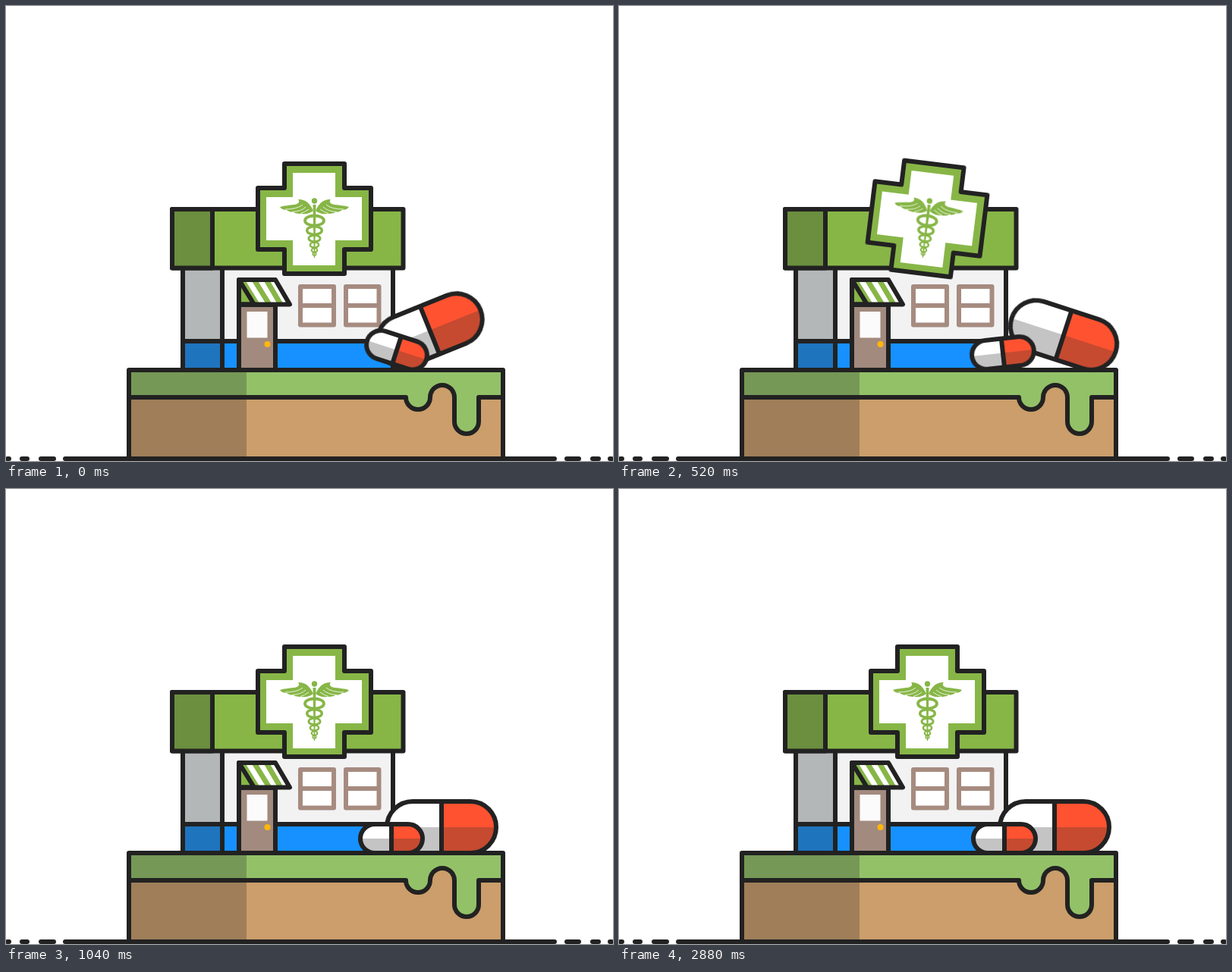
Write an HTML page that moves like this. It is 800 px wide and 600 px high and loops after 3200 ms.

```html
<!DOCTYPE html>
<html lang="en">
<head>
<meta charset="utf-8">
<title>Pharmacy</title>
<style>
  html, body { margin: 0; width: 100%; height: 100%; overflow: hidden; background: #fff; }
  svg { display: block; width: 800px; height: 600px; }
  .ink { stroke: #222; stroke-width: 6; stroke-linejoin: round; stroke-linecap: round; }
  .line { fill: none; }
  .leaf { fill: #87b647; }
  .moss { fill: #6b8e3f; }
  .frame { fill: #fff; stroke: #a68b80; stroke-width: 6; stroke-linejoin: round; }
</style>
</head>
<body>
<svg viewBox="0 0 800 600">
  <defs>
    <clipPath id="bigClip"><rect x="-72" y="-34" width="144" height="68" rx="34"/></clipPath>
    <clipPath id="smallClip"><rect x="-41" y="-19" width="82" height="38" rx="19"/></clipPath>
    <g id="halves">
      <rect x="-80" y="-40" width="80" height="40" fill="#fff"/>
      <rect x="-80" width="80" height="40" fill="#c4c4c4"/>
      <rect y="-40" width="80" height="40" fill="#ff5231"/>
      <rect width="80" height="40" fill="#c54a30"/>
    </g>
    <g id="wing">
      <path class="leaf" d="M405 270 C402 263 396 254 385 255 C388 258 385 262 379 262 C373 263 367 263 361 265 C363 268 367 269 370 269 C372 271 376 272 379 272 C382 274 388 274 390 274 C396 275 401 273 405 270Z"/>
      <path fill="none" stroke="#fff" stroke-width=".8" d="M368 268 Q384 268 391 262 M377 271.5 Q389 271 395 265 M388 273.5 Q394 272 399 268"/>
    </g>
  </defs>

  <!-- ground -->
  <path class="ink line" d="M2 597H4 M21 597H28 M46 597H63 M78 597H723 M739 597H755 M773 597H781 M796 597H798"/>
  <path fill="#cb9e6b" d="M162 480H655V597H162Z"/>
  <path fill="#93c168" d="M162 480H655V516H623V548A16 16 0 0 1 591 548V516A16 16 0 0 0 559 516A16 16 0 0 1 527 516H162Z"/>
  <path fill="#9f7e59" d="M162 516H317V597H162Z"/>
  <path fill="#769856" d="M162 480H317V516H162Z"/>
  <path class="ink line" d="M162 480H655V597H162Z M162 516H527A16 16 0 0 0 559 516A16 16 0 0 1 591 516V548A16 16 0 0 0 623 548V516H655"/>

  <!-- shop walls and roof -->
  <path fill="#b3b7b8" d="M233 345H285V442H233Z"/>
  <path fill="#f2f2f3" d="M285 345H510V442H285Z"/>
  <path fill="#1f74be" d="M233 442H285V480H233Z"/>
  <path fill="#1691ff" d="M285 442H510V480H285Z"/>
  <path class="ink line" d="M233 345H510V480H233Z M285 345V480 M233 442H510"/>
  <path class="ink leaf" d="M219 268H523.5V345.5H219Z"/>
  <path class="ink moss" d="M219 268H272V345.5H219Z"/>

  <!-- windows, door, awning -->
  <path class="frame" d="M388 370H432V420.5H388Z M388 395H432"/>
  <path class="frame" d="M448 370H491.5V420.5H448Z M448 395H492"/>
  <path class="ink" fill="#a28a7e" d="M307 394H355V480H307Z"/>
  <path fill="#fbfbfb" d="M317.500 403H344.500V437.500H317.500Z"/>
  <circle cx="344.500" cy="446" r="4" fill="#ffb70a"/>
  <path fill="#fff" d="M307 361H355L374 393.500H307Z"/>
  <path class="leaf" d="M307 361h8l20 32.500h-8z M323 361h8l20 32.500h-8z M339 361h8l19 32.500h-8z"/>
  <path class="ink leaf" d="M307 361L327 393.500H307Z"/>
  <path class="ink line" d="M307 361H355L374 393.500H307Z"/>

  <g id="sign">
    <path class="ink leaf" d="M367 208H446V240H481V321H446V353H367V321H332V240H367Z"/>
    <path fill="#fff" d="M378 220H434V252H469V309H434V342H378V309H343V252H378Z"/>
    <use href="#wing"/>
    <use href="#wing" transform="matrix(-1 0 0 1 813 0)"/>
    <circle class="leaf" cx="406.500" cy="257" r="3.700"/>
    <path class="leaf" d="M404.500 262H408.500L407.200 332H405.800Z"/>
    <g id="coils" fill="none" stroke="#87b647"></g>
  </g>

  <g id="big">
    <use href="#halves" clip-path="url(#bigClip)"/>
    <path class="ink line" d="M0 -34V34"/>
    <rect class="ink line" x="-72" y="-34" width="144" height="68" rx="34"/>
  </g>
  <g id="small">
    <use href="#halves" clip-path="url(#smallClip)"/>
    <path class="ink line" d="M0 -19V19"/>
    <rect class="ink line" x="-41" y="-19" width="82" height="38" rx="19"/>
  </g>
</svg>
<script>
const LOOP = 3200, TICK = 40;
const byId = id => document.getElementById(id);

// Snake coils: y, half width, half height, line width
const coils = [[283, 12.5, 6.5, 3.8], [296, 9.8, 5.3, 3.4], [306.5, 7.6, 4.3, 3],
               [315, 5.6, 3.5, 2.5], [322, 3.8, 2.8, 2], [327, 2.3, 2, 1.5]];
byId('coils').innerHTML = coils.map(([y, rx, ry, w]) =>
  `<ellipse cx="406.5" cy="${y}" rx="${rx}" ry="${ry}" stroke-width="${w}"/>`).join('');

// Rocking of the pills: time, amount (-1 left, 1 right)
const rocking = [[0, -1], [200, 0], [460, 1], [700, 0], [880, -0.57], [1040, 0]];

function rock(t) {
  const i = rocking.findIndex(([time]) => time > t);
  if (i < 0) return 0;
  const [t0, a] = rocking[i - 1], [t1, b] = rocking[i];
  const angle = (t - t0) / (t1 - t0) * Math.PI / 2;
  return a + (b - a) * (b === 0 ? 1 - Math.cos(angle) : Math.sin(angle));
}

const place = (x, y, angle) => `translate(${x}px, ${y}px) rotate(${angle}deg)`;

// Rest position plus a share of the leftmost or rightmost offset [dx, dy, angle]
const pill = (x, y, left, right) => t => {
  const amount = rock(t), share = Math.abs(amount);
  const [dx, dy, angle] = (amount < 0 ? left : right).map(v => v * share);
  return place(x + dx, y + dy, angle);
};

function signPose(t) {
  const angle = t < 1000 ? 7 * (1 - Math.abs(t / 500 - 1) ** 3) : 0;
  return `${place(406.5, 280.5, angle)} translate(-406.5px, -280.5px)`;
}

function play(id, pose) {
  const steps = LOOP / TICK;
  const frames = Array.from({ length: steps + 1 }, (_, i) => ({
    offset: i / steps,
    transform: pose(Math.min(i, steps - 1) * TICK),
    easing: 'steps(1, end)'
  }));
  byId(id).animate(frames, { duration: LOOP, iterations: Infinity });
}

play('sign', signPose);
play('big', pill(574, 446, [-15.5, -18.5, -22], [13, -13, 19.5]));
play('small', pill(508, 461, [7, -7.3, 18], [-2.2, -3.8, -6.8]));
</script>
</body>
</html>
```
